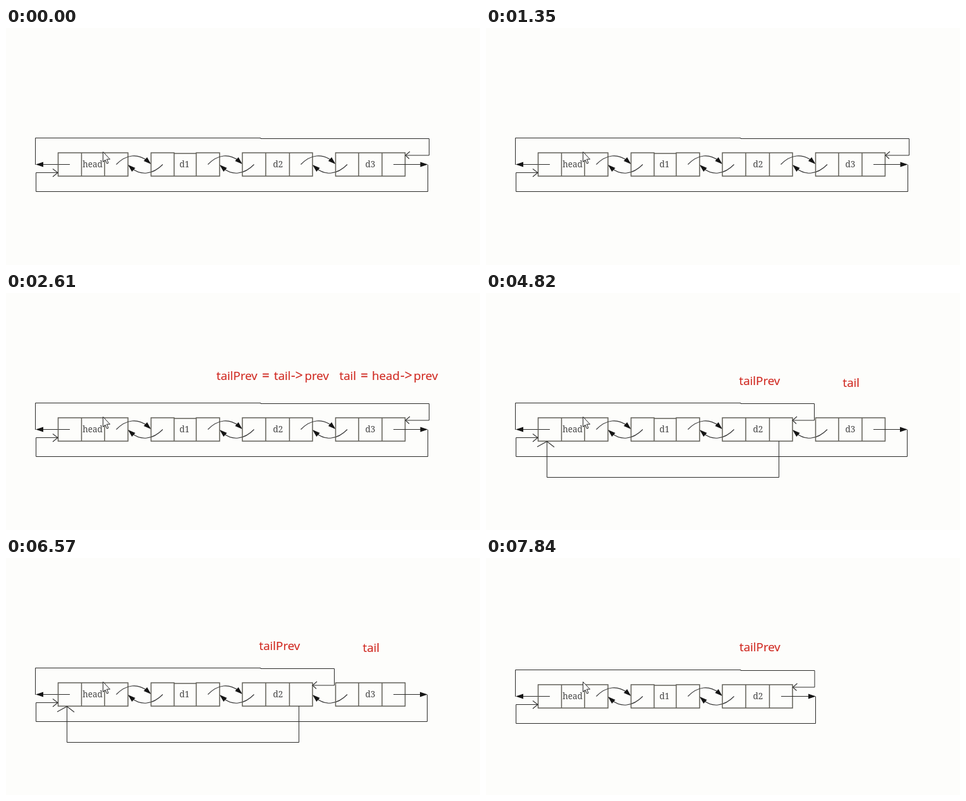
An HTML page that plays this animation: 750x376 px, repeating every 8000 ms.

```html
<!DOCTYPE html>
<html lang="en">
<head>
<meta charset="utf-8">
<title>Removing the last node of a circular doubly linked list</title>
<style>
  html, body { margin: 0; width: 100%; height: 100%; overflow: hidden; background: #fdfdfb; }
  svg { display: block; width: 750px; height: 376px; }
  path { fill: none; stroke: #333; stroke-width: 1.1; }
  .wire { stroke: #2c2c2a; stroke-width: 1; }
  .cell { stroke: #626058; stroke-width: 1.5; }
  .tip { fill: #151515; stroke: none; }
  .label { font: 13.5px "Noto Serif", serif; fill: #444; text-anchor: middle; }
  .note { font: 18.8px "Open Sans", "Noto Sans", sans-serif; fill: #d02a22; stroke: #d02a22; stroke-width: .2; }
  .sign { font-size: 21px; }
  .cursor { fill: #fff; stroke: #222; stroke-width: 1; }
</style>
</head>
<body>
<svg viewBox="0 0 750 376">
  <g id="stage"></g>
  <path class="cursor" d="M153.5 196.500V212.500L157 209.200L159.700 215.200L162 214.100L159.400 208.200H164.500Z"/>
</svg>
<script>
const LOOP = 8000;
const CELLS = [[82.5, 119.5, 156, 193], [229.5, 266, 301, 338], [374, 411, 448.5, 485], [521.5, 558, 595, 631.5]];
const NAMES = ["head", "d1", "d2", "d3"];
const LABEL_X = [137, 282.5, 430.5, 576.5];

const line = (d, cls = "") => `<path class="${cls}" d="${d}"/>`;
const tip = (x, y, angle) =>
  `<path class="tip" d="M0 0L-12 -4V4Z" transform="translate(${x} ${y}) rotate(${angle})"/>`;
const note = (x, y, text, cls = "") => `<text class="note ${cls}" x="${x}" y="${y}">${text}</text>`;

function node(i) {
  const [a, b, c, d] = CELLS[i];
  const top = i === 1 ? 199 : 198;
  return line(`M${b} 198H${a}V235H${b}ZM${c} 198H${d}V235H${c}ZM${b} ${top}H${c}M${b} 235H${c}`, "cell") +
    `<text class="label" x="${LABEL_X[i]}" y="220.5">${NAMES[i]}</text>`;
}

function nextArc(i) {
  const from = CELLS[i][3] - 18.5, to = CELLS[i + 1][0];
  return line(`M${from} 216.500C${from + 16} 200 ${from + 34} 199 ${to - 6} 210.500`) + tip(to, 216, 42);
}

function prevArc(i) {
  const from = CELLS[i + 1][0] + 18.5, to = CELLS[i][3];
  return line(`M${from} 216.500C${from - 16} 233 ${from - 35} 234 ${to + 6} 222.500`) + tip(to, 217, 222);
}

// Outer wires: the upper one enters the last node, the lower one enters the head.
const upperWire = (right, entry) =>
  line(`M46.500 217V174.500H403V175.500H${right}V202H${entry}`, "wire") +
  line(`M${entry + 7} 196L${entry} 202L${entry + 6} 207.500`);
const lowerWire = right =>
  line(`M${right} 217V259.500H47.500V229.500H82`, "wire") + line("M74 223.500L82 229.500L74 236");
const leftArrow = line("M101 216.500H56", "wire") + tip(47, 216.5, 180);
const rightArrow = (from, to) => line(`M${from} 216.500H${to - 9}`, "wire") + tip(to, 216.5, 0);

const chain = (count, skipNext = -1) => {
  let out = leftArrow;
  for (let i = 0; i < count; i++) {
    out += node(i);
    if (i < count - 1) out += (i === skipNext ? "" : nextArc(i)) + prevArc(i);
  }
  return out;
};
const group = (dy, content) => `<g transform="translate(0 ${dy})">${content}</g>`;

const fullList = chain(4) + upperWire(669.5, 632) + lowerWire(667.5) + rightArrow(613, 667.5);

const assignments = [
  [333, "tailPrev"], [405, "=", "sign"], [424, "tail"], [451, "-&gt;", "sign"], [472.5, "prev"],
  [527.5, "tail"], [561, "=", "sign"], [579, "head"], [624, "-&gt;", "sign"], [645, "prev"]
].map(([x, text, cls]) => note(x, 138, text, cls)).join("");

const relinked = chain(4, 2) + upperWire(519.5, 485) + lowerWire(666.5) + rightArrow(613, 667) +
  line("M463.500 235V292.500H96.500V236", "wire") + line("M81 244L96.500 235.500L108 244.500");

const shortened = chain(3) + upperWire(520, 485.5) + lowerWire(521.5) + rightArrow(467, 522);

const scenes = [
  [0, fullList],
  [2450, fullList + assignments],
  [4820, relinked + note(400.5, 146, "tailPrev") + note(564.5, 149, "tail")],
  [7670, group(3, shortened) + note(401, 148, "tailPrev")]
];

const stage = document.getElementById("stage");
const origin = performance.now();
let shown = null;

function draw() {
  const t = (performance.now() - origin) % LOOP;
  const scene = scenes.findLast(([start]) => t >= start);
  if (scene !== shown) {
    shown = scene;
    stage.innerHTML = scene[1];
  }
  requestAnimationFrame(draw);
}
draw();
</script>
</body>
</html>
```
